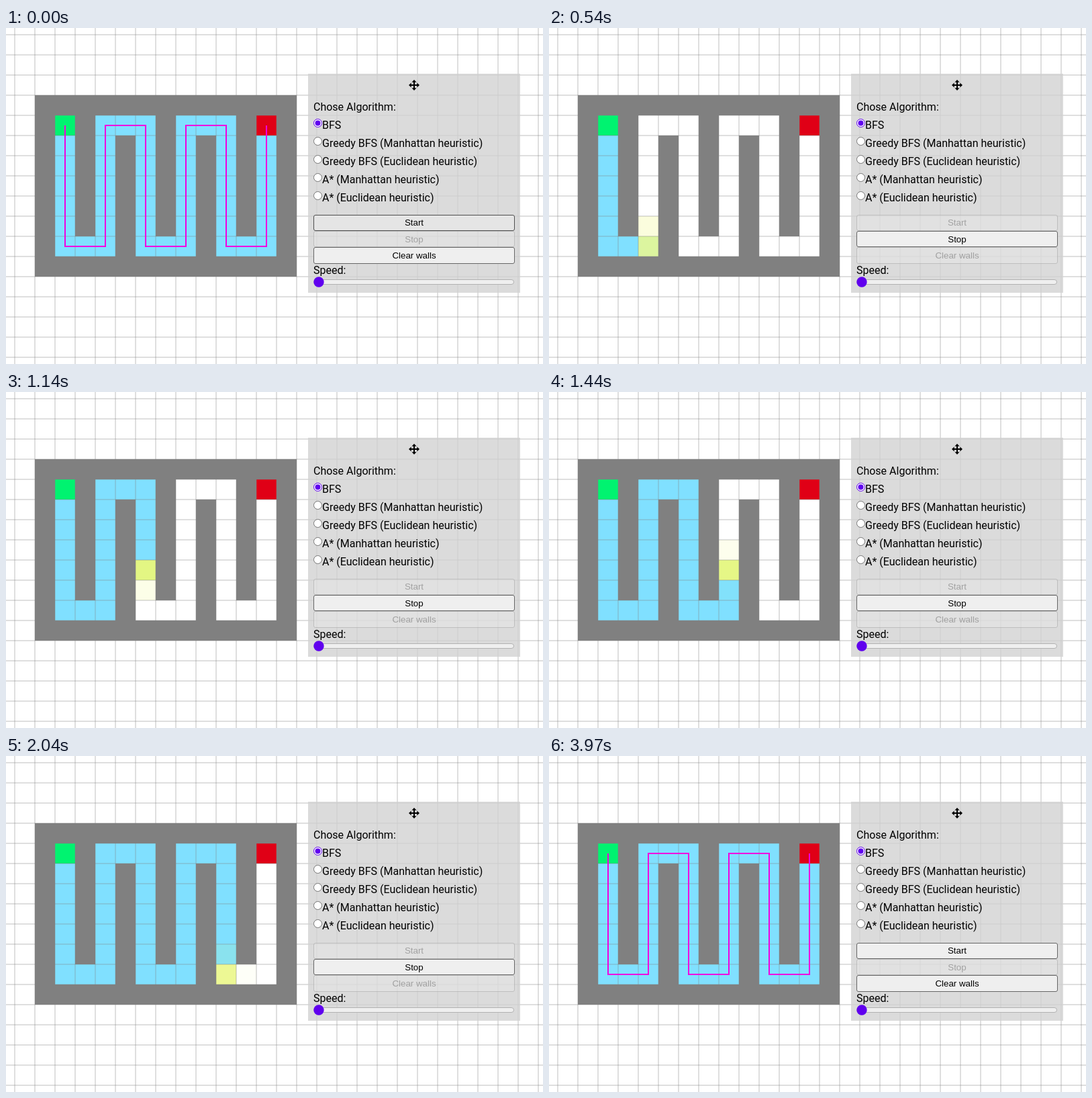
Recreate the animation shown at these times as an HTML page. Size 800 by 500 pixels, loop 4500 ms.

```html
<!DOCTYPE html>
<html lang="en">
<head>
<meta charset="utf-8">
<title>Maze search</title>
<style>
html, body { margin: 0; width: 100%; height: 100%; overflow: hidden; background: #fff; }
svg { display: block; width: 800px; height: 500px; }
.label { font: 16px Roboto, sans-serif; fill: #000; }
.btn text { font: 13.333px "Liberation Sans", Arial, sans-serif; text-anchor: middle; fill: #000; }
.btn rect { fill: #efefef; stroke: #666; }
.btn.hover rect { fill: #e5e5e5; stroke: #4f4f4f; }
.btn.off rect { fill: rgba(239,239,239,.3); stroke: rgba(118,118,118,.3); }
.btn.off text { fill: rgba(16,16,16,.3); }
</style>
</head>
<body>
<svg id="stage" viewBox="0 0 800 500" xmlns="http://www.w3.org/2000/svg"></svg>
<script>
const LOOP = 4500, FPS = 30;
const CELL = 30, LEFT = 43, TOP = 100;
const BLUE = [128, 224, 255], ACCENT = '#6000ee';
const FIRST = 59.8, STEP = 50.4;   // ms at which cell 0 is reached, ms per cell
const RUN = 2, FOUND = 73, SETTLED = 119;   // ticks

// Colour of a cell by its age in ms: white, yellow, blue
const FADE = [
  [0, 255, 255, 255], [8, 254, 255, 248], [22, 250, 253, 216],
  [55, 241, 249, 158], [65, 228, 246, 128], [72, 218, 245, 169],
  [104, 145, 228, 226], [115, ...BLUE]
];

const stage = document.getElementById('stage');

function add(tag, attrs, parent = stage, text) {
  const el = document.createElementNS('http://www.w3.org/2000/svg', tag);
  for (const name in attrs) el.setAttribute(name, attrs[name]);
  if (text) el.textContent = text;
  return parent.appendChild(el);
}

const rgb = c => `rgb(${c.map(Math.round).join()})`;

function cellColor(age) {
  if (age <= 0) return '#fff';
  const n = FADE.findIndex(s => s[0] > age);
  if (n < 0) return rgb(BLUE);
  const a = FADE[n - 1], b = FADE[n];
  const u = (age - a[0]) / (b[0] - a[0]);
  return rgb([1, 2, 3].map(j => a[j] + (b[j] - a[j]) * u));
}

// The corridor winds down and up between rows 1 and 7
function corridor() {
  const cells = [];
  for (let col = 1; col <= 11; col++) {
    const down = col % 4 === 1;
    if (col % 2) {
      for (let r = 1; r <= 7; r++) cells.push([col, down ? r : 8 - r]);
    } else {
      cells.push([col, col % 4 === 2 ? 7 : 1]);
    }
  }
  return cells;
}

const route = corridor();
const last = route.length - 1;

add('rect', { x: LEFT, y: TOP, width: 13 * CELL, height: 9 * CELL, fill: '#808080' });
const cells = route.map(([c, r], i) => add('rect', {
  x: LEFT + c * CELL, y: TOP + r * CELL, width: CELL, height: CELL,
  fill: i === 0 ? '#00f370' : i === last ? '#e00016' : '#fff'
}));

let grid = '';
for (let x = 13; x < 800; x += CELL) grid += `M${x} 0V500`;
for (let y = 10; y < 500; y += CELL) grid += `M0 ${y}H800`;
add('path', { d: grid, stroke: '#808080', 'stroke-opacity': .5, fill: 'none' });

const trail = add('polyline', {
  points: route.map(([c, r]) => [LEFT + (c + .5) * CELL, TOP + (r + .5) * CELL]).join(' '),
  fill: 'none', stroke: '#f000e0', 'stroke-width': 2
});

// Control panel
add('rect', { x: 450, y: 68, width: 316, height: 326, fill: '#d3d3d3', 'fill-opacity': .8 });

const handle = add('g', { transform: 'translate(608 85)' });
add('path', { d: 'M-6 0H6M0 -6V6', stroke: '#000', 'stroke-width': 2 }, handle);
for (let a = 0; a < 360; a += 90) {
  add('path', { d: 'M0 -8L3.5 -4.3H-3.5Z', transform: `rotate(${a})` }, handle);
}

const label = (x, y, text) => add('text', { class: 'label', x, y }, stage, text);
label(458, 123, 'Chose Algorithm:');
[
  'BFS',
  'Greedy BFS (Manhattan heuristic)',
  'Greedy BFS (Euclidean heuristic)',
  'A* (Manhattan heuristic)',
  'A* (Euclidean heuristic)'
].forEach((name, i) => {
  const cx = 464.5, cy = 141.5 + 27 * i;
  add('circle', { cx, cy, r: 6, fill: '#fff', stroke: i ? '#767676' : ACCENT });
  if (!i) add('circle', { cx, cy, r: 4, fill: ACCENT });
  label(471, 150 + 27 * i, name);
});

function button(y, height, base, text) {
  const g = add('g', { class: 'btn' });
  add('rect', { x: 458.5, y: y + .5, width: 299, height: height - 1, rx: 2.5 }, g);
  add('text', { x: 608, y: base }, g, text);
  return g;
}
const start = button(278, 24, 294, 'Start');
const stop = button(302, 24, 319, 'Stop');
const clear = button(326, 25, 343, 'Clear walls');

label(458, 366, 'Speed:');
add('rect', { x: 458.5, y: 374.5, width: 298, height: 7, rx: 3.5, fill: '#efefef', stroke: '#b2b2b2' });
add('circle', { cx: 466, cy: 378, r: 7.7, fill: ACCENT });

const setState = (el, state) => el.setAttribute('class', 'btn ' + state);

function draw(ms) {
  const tick = Math.floor(Math.floor(ms / 10) * 10 * FPS / 1000 + 1e-6);
  const running = tick >= RUN && tick < FOUND;
  const settled = tick < RUN || tick >= SETTLED;
  const now = Math.min(tick, FOUND) * 1000 / FPS;

  for (let i = 1; i < last; i++) {
    const age = settled ? Infinity : now - FIRST - STEP * i;
    cells[i].setAttribute('fill', cellColor(age));
  }
  trail.setAttribute('visibility', running ? 'hidden' : 'visible');
  setState(start, running ? 'off' : tick < RUN ? 'hover' : '');
  setState(stop, running ? '' : 'off');
  setState(clear, running ? 'off' : '');
}

const begin = performance.now();
function loop() {
  draw((performance.now() - begin) % LOOP);
  requestAnimationFrame(loop);
}
draw(0);
requestAnimationFrame(loop);
</script>
</body>
</html>
```
